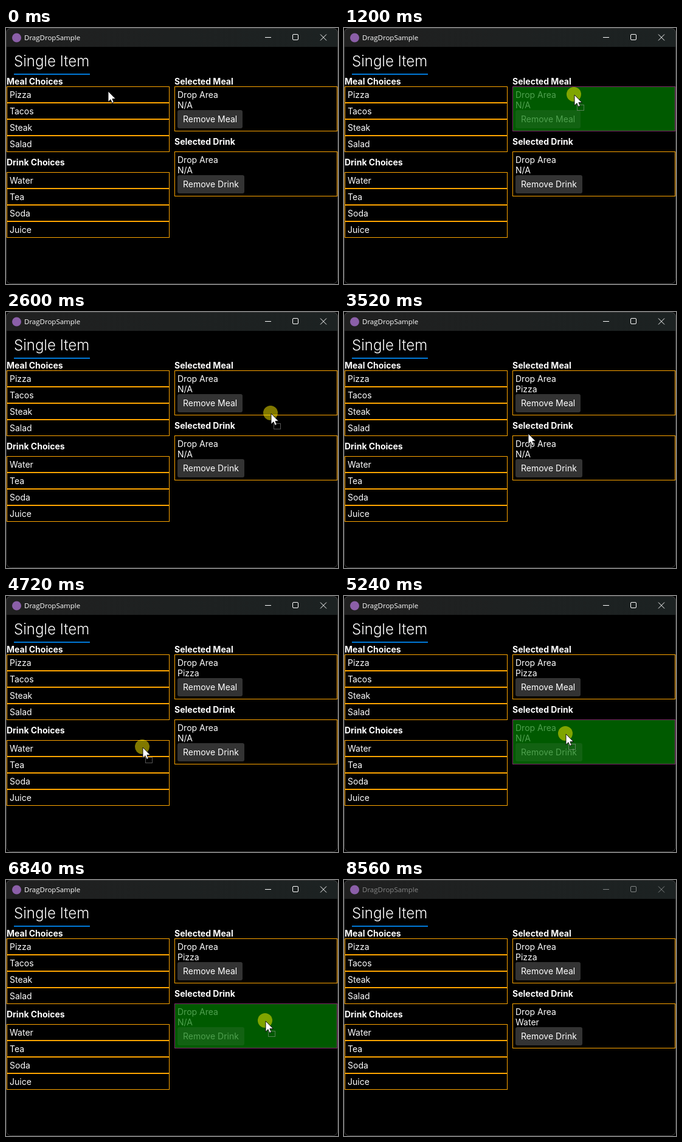
Animation, 546 px wide and 421 px high, one loop 8.64 s. Source, as an HTML page:

```html
<!DOCTYPE html>
<html lang="en">
<head>
<meta charset="utf-8">
<title>DragDropSample</title>
<style>
  html, body { margin: 0; width: 100%; height: 100%; overflow: hidden; background: #000; }
  svg { display: block; }
  text { font: 14px Inter, sans-serif; fill: #fff; white-space: pre; }
  .bold { font-weight: 700; }
  .tab { font-size: 24px; font-weight: 300; }
  .caption { font: 11.5px "Open Sans", sans-serif; }
  .box { fill: #000; stroke: #ffa500; }
  .button { fill: #333; }
  .over .box { fill: #005a00; stroke: #80286a; }
  .over .button { fill: #126212; }
  .over text { fill: #4fa04f; }
</style>
</head>
<body>
<svg id="stage" width="546" height="421" viewBox="0 0 546 421"></svg>
<script>
const LOOP = 8640, TICK = 40;

const text = (x, y, label, attrs = '') => `<text x="${x}" y="${y}" ${attrs}>${label}</text>`;
const box = (x, y, h) => `<rect class="box" x="${x + .5}" y="${y + .5}" width="267" height="${h - 1}"/>`;
const list = (y, items) => items.map((item, i) =>
  box(1, y + 27 * i, 27) + text(6, y + 27 * i + 19, item)).join('');
const panel = (id, y, action, width) => `<g id="${id}">
  ${box(277, y, 74)}${text(282, y + 19, 'Drop Area')}${text(282, y + 36, 'N/A', 'class="value"')}
  <rect class="button" x="282" y="${y + 39}" width="${width}" height="30" rx="3"/>
  ${text(291, y + 59, action)}</g>`;

const stage = document.getElementById('stage');
stage.innerHTML = `
  <defs><linearGradient id="bar"><stop stop-color="#202020"/><stop offset="1" stop-color="#1c2222"/></linearGradient></defs>
  <path d="M0 31V8Q0 0 8 0H538Q546 0 546 8V31Z" fill="url(#bar)"/>
  <circle cx="17.5" cy="16" r="7.5" fill="#8b5fa8"/>
  <g id="title">
    ${text(30, 20, 'DragDropSample', 'class="caption"')}
    <g fill="none" stroke="#fff"><path d="M426 15.5h10M517 10.5l10 10m0-10l-10 10"/>
    <rect x="471.5" y="10.5" width="9" height="9" rx="1.5"/></g>
  </g>
  ${text(13, 63, 'Single Item', 'class="tab"')}
  <rect x="13" y="75" width="125" height="2" fill="#0078d7"/>
  ${text(1, 93, 'Meal Choices', 'class="bold"')}
  ${list(96, ['Pizza', 'Tacos', 'Steak', 'Salad'])}
  ${text(1, 226, 'Drink Choices', 'class="bold"')}
  ${list(237, ['Water', 'Tea', 'Soda', 'Juice'])}
  ${text(277, 93, 'Selected Meal', 'class="bold"')}
  ${panel('meal', 96, 'Remove Meal', 107)}
  ${text(277, 192, 'Selected Drink', 'class="bold"')}
  ${panel('drink', 203, 'Remove Drink', 110)}
  <rect x=".5" y=".5" width="545" height="420" rx="8" fill="none" stroke="#3c3c3c"/>
  <g id="pointer">
    <circle id="press" r="12" fill="#fff000" fill-opacity=".5"/>
    <path d="M1 1V18.5L5 14.7L7.5 20.4L10.3 19.2L7.9 13.6H13.3Z" fill="#fff" stroke="#000" stroke-width=".9"/>
    <rect id="ghost" x="5.5" y="17.5" width="11" height="9" fill="none" stroke="#aaa" stroke-dasharray="1 1"/>
  </g>`;

const byId = id => document.getElementById(id);
const [title, meal, drink, pointer, press, ghost] =
  ['title', 'meal', 'drink', 'pointer', 'press', 'ghost'].map(byId);

// Pointer moves: start, end, x, y
const moves = [
  [760, 1200, 378, 109],
  [1560, 1920, 436, 242],
  [2280, 2800, 434, 129],
  [3280, 3720, 202, 252],
  [4600, 5120, 364, 226],
  [5520, 5960, 424, 111],
  [6320, 6800, 426, 231],
  [7720, 8240, 510, 425],
];
// Drags: press, first move, drop
const drags = [
  { node: meal, value: 'Pizza', down: 480, start: 800, drop: 2960, top: 96, bottom: 166 },
  { node: drink, value: 'Water', down: 4320, start: 4640, drop: 7280, top: 203, bottom: 277 },
];

const progress = (t, from, to) => Math.min(1, Math.max(0, (t - from) / (to - from)));
const smooth = p => p * p * (3 - 2 * p);
const show = (node, on) => node.setAttribute('visibility', on ? 'visible' : 'hidden');

function pointerAt(t) {
  let x = 167, y = 103;
  for (const [from, to, toX, toY] of moves) {
    const p = smooth(progress(t, from, to));
    x += (toX - x) * p;
    y += (toY - y) * p;
  }
  return [Math.round(x), Math.round(y)];
}

function render(t) {
  const [x, y] = pointerAt(t);
  pointer.setAttribute('transform', `translate(${x} ${y})`);
  show(pointer, t < 8280);
  show(press, drags.some(d => t >= d.down && t < d.drop));
  show(ghost, drags.some(d => t >= d.start && t < d.drop));
  for (const d of drags) {
    const over = t >= d.start && t < d.drop && x >= 277 && y >= d.top && y < d.bottom;
    d.node.classList.toggle('over', over);
    d.node.querySelector('.value').textContent = t < d.drop ? 'N/A' : d.value;
  }
  title.setAttribute('opacity', 1 - .55 * progress(t, 8440, 8560));
}

function frame() {
  const t = performance.now() % LOOP;
  render(Math.floor(t / TICK) * TICK);
  requestAnimationFrame(frame);
}
frame();
</script>
</body>
</html>
```
